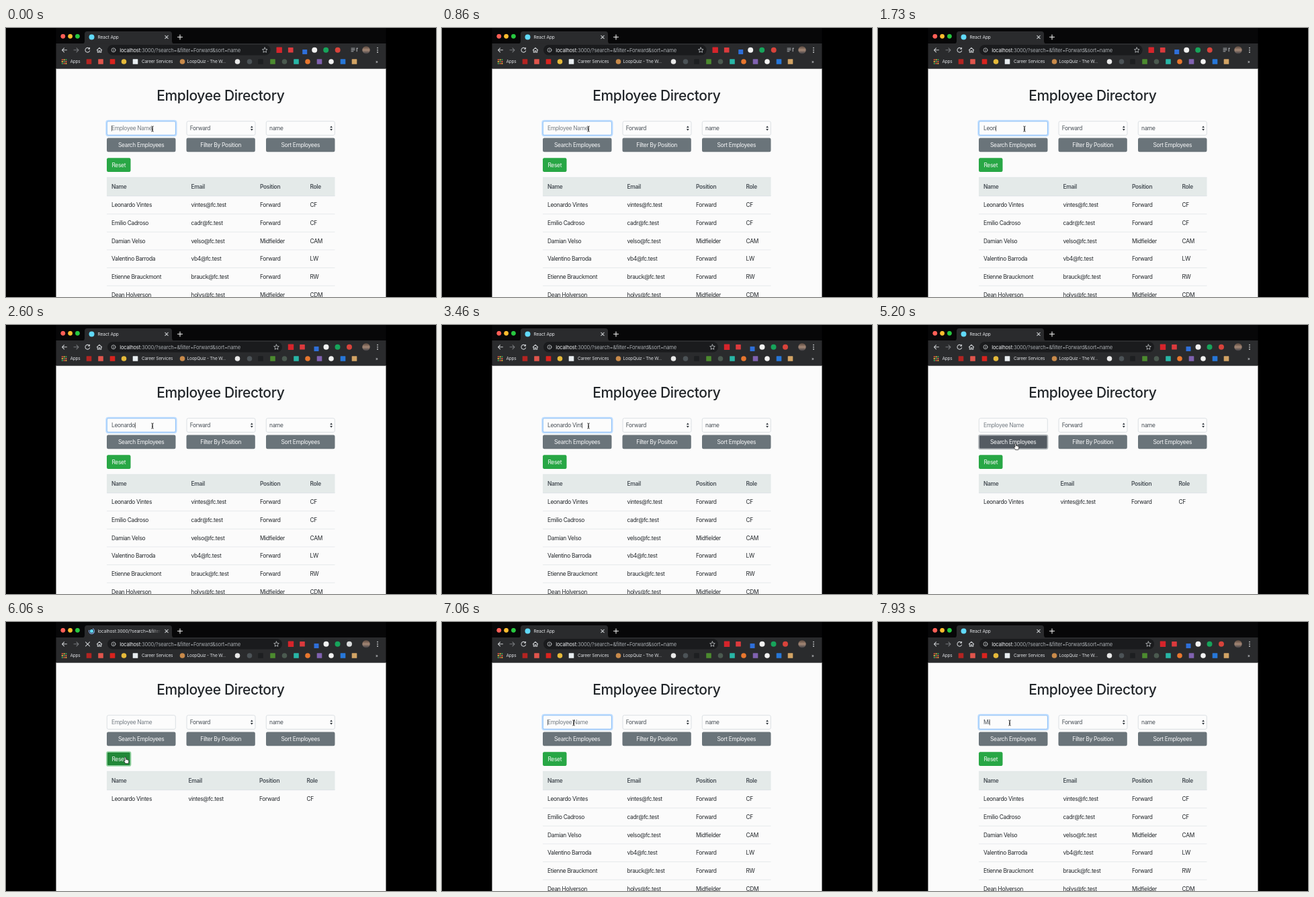
Write an HTML page that moves like this. It is 640 by 400 pixels and loops after 8000 ms.

```html
<!DOCTYPE html>
<html lang="en">
<head>
<meta charset="utf-8">
<title>Employee Directory</title>
<style>
  html, body { margin: 0; height: 100%; overflow: hidden; background: #000; }
  svg { display: block; width: 100vw; height: 100vh; }
  text { font: 8.4px Inter, Roboto, sans-serif; letter-spacing: -.3px; fill: #212529; white-space: pre; }
  .title { font-size: 21px; font-weight: 500; letter-spacing: -.35px; }
  .tab { font-size: 6.6px; letter-spacing: -.1px; fill: #e3e5e8; }
  .url { font-size: 7.6px; letter-spacing: -.2px; fill: #a6aaae; }
  .url tspan { fill: #eceef0; }
  .mark { font-size: 6.5px; letter-spacing: -.2px; fill: #dddfe2; }
  .mid { text-anchor: middle; }
  .btn text { fill: #f8f9fa; }
  .field { fill: #fcfcfc; stroke: #ced4da; stroke-width: .7; }
  .value { fill: #495057; }
  .hint { fill: #747c83; }
  .head text { font-weight: 600; fill: #495057; }
  .line { fill: none; stroke: #c6c9cc; stroke-width: 1.1; stroke-linecap: round; stroke-linejoin: round; }
  .rule { stroke: #dee2e6; stroke-width: .7; }
</style>
</head>
<body>
<svg viewBox="0 0 640 400">
  <defs>
    <linearGradient id="fade" gradientUnits="userSpaceOnUse" x1="216" x2="231">
      <stop stop-color="#fff"/><stop offset="1" stop-color="#000"/>
    </linearGradient>
    <mask id="tabMask"><path d="M117 5h115v18h-115z" fill="url(#fade)"/></mask>
    <linearGradient id="portrait" x2="0" y2="1">
      <stop stop-color="#57463d"/><stop offset=".5" stop-color="#a58876"/><stop offset="1" stop-color="#3b3c42"/>
    </linearGradient>
  </defs>

  <rect x="74.500" y="60" width="491" height="340" fill="#fbfbfb"/>
  <rect x="74.500" width="491" height="24" fill="#070708"/>
  <rect x="74.500" y="23" width="491" height="37.700" fill="#2a2b2d"/>
  <path d="M113 23.500q4 0 4-4V9q0-4 4-4h122q4 0 4 4v10.500q0 4 4 4z" fill="#2a2b2d"/>
  <g id="lights"></g>
  <g id="favicon">
    <circle id="favDot" cx="127.500" cy="13.500" fill="#61dafb"/>
    <path id="spinner" d="M127.500 9.500a4 4 0 1 1-4 4" fill="none" stroke="#8ab4f8"/>
  </g>
  <g mask="url(#tabMask)"><text id="tabTitle" class="tab" x="136.500" y="16"></text></g>
  <path class="line" d="M236.800 11.300l4.400 4.400m0-4.400l-4.400 4.400"/>
  <path class="line" d="M259 10v7m-3.500-3.500h7" style="stroke:#eee"/>

  <path class="line" d="M90.500 32.800h-7m3-3l-3 3 3 3"/>
  <path class="line" d="M101 32.800h7m-3-3l3 3-3 3" style="stroke:#777a7d"/>
  <path id="reload" class="line" d="M124.300 31a3.400 3.400 0 1 0 .3 2.800m-.1-4.600v2h-2"/>
  <path id="stop" class="line" d="M118.500 29.800l6 6m0-6l-6 6"/>
  <path class="line" d="M135.300 32.800l3.700-3.400 3.700 3.400m-6.400-.6v4h1.900v-2.400h1.600v2.400h1.900v-4"/>
  <rect id="pill" x="151" y="25" height="15.500" rx="7.700" fill="#1a1b1d"/>
  <g class="line" style="stroke-width:.8"><circle cx="160" cy="32.800" r="3"/><path d="M160 32.500v1.800m0-3.200v.1"/></g>
  <text class="url" x="169.300" y="35.500"><tspan>localhost</tspan>:3000/?search=&amp;filter=Forward&amp;sort=name</text>
  <g id="tools">
    <path class="line" style="stroke-width:.8" d="M402.500 29l1.100 2.500 2.700.3-2 1.800.5 2.700-2.300-1.300-2.300 1.300.5-2.700-2-1.800 2.700-.3z"/>
    <g id="extensions"></g>
    <circle id="devtools" cx="511" cy="32.800" r="4"/>
  </g>
  <path id="media" class="line" style="stroke-width:.9" d="M514 30.200h5m-5 2.300h5m-5 2.300h3m5.200-4.600v4.600m0-4.600h1.300"/>
  <circle cx="536" cy="32.800" r="5.700" fill="url(#portrait)"/>
  <g fill="#d2d4d6"><circle cx="553" cy="29.600" r=".9"/><circle cx="553" cy="32.800" r=".9"/><circle cx="553" cy="36" r=".9"/></g>

  <g id="bookmarks"></g>
  <text class="mark" x="95.500" y="52.300">Apps</text>
  <text class="mark" x="202" y="52.300">Career Services</text>
  <text class="mark" x="269.500" y="52.300">LoopQuiz - The W...</text>
  <text class="mark" x="550" y="52.300">»</text>

  <text class="title mid" x="319.400" y="107.500">Employee Directory</text>
  <g id="form"></g>
  <rect id="inputRing" x="149.200" y="137.700" width="104.400" height="22.600" rx="3" fill="none" stroke="#bfdeff" stroke-width="1.800"/>
  <rect id="inputEdge" x="150.300" y="138.800" width="102.200" height="20.400" rx="2" fill="none" stroke="#80bdff" stroke-width=".8"/>
  <text id="typed" class="value" x="157" y="152"></text>
  <path id="caret" d="M0 145v8.500" stroke="#333" stroke-width=".7"/>

  <rect x="150" y="222" width="339.500" height="28" fill="#e4eae9"/>
  <path class="rule" d="M150 222.200h339.500"/>
  <path class="rule" d="M150 249.700h339.500" style="stroke-width:1.100"/>
  <g id="allRows"></g>
  <g id="oneRow"></g>

  <g id="beam" fill="none">
    <path d="M-1.800-4q1.800 0 1.800 1v6q0 1-1.800 1m3.600-8q-1.800 0-1.800 1v6q0 1 1.800 1M-1 .8h2" stroke="#222" stroke-width=".8"/>
  </g>
  <path id="hand" d="M-1-3q0-1 .9-1t.9 1v2.600q.9-.5 1.400.2.900-.3 1.300.4 1.200-.2 1.200 1v1.800q0 1.100-.8 2.500h-4.100q-.5-1.200-1.600-2.400-1.300-1.300-.4-1.900.5-.3 1.200.6z" fill="#fff" stroke="#111" stroke-width=".7"/>
  <path id="arrow" d="M0 0v8l1.900-1.700 1.300 2.900 1.300-.6-1.300-2.800h2.600z" fill="#111" stroke="#fff" stroke-width=".6"/>
</svg>
<script>
const $ = id => document.getElementById(id);
const show = (id, on) => { $(id).style.display = on ? '' : 'none'; };
const circle = (x, y, r, color) => `<circle cx="${x}" cy="${y}" r="${r}" fill="${color}"/>`;
const square = (x, y, r, color) =>
  `<rect x="${x - r}" y="${y - r}" width="${2 * r}" height="${2 * r}" rx=".6" fill="${color}"/>`;
const label = (x, y, text, cls = '') => `<text class="${cls}" x="${x}" y="${y}">${text}</text>`;

// Browser chrome
$('lights').innerHTML = ['#ff5f57', '#febc2e', '#28c840']
  .map((color, i) => circle(84.8 + i * 10.8, 12.3, 3.4, color)).join('');

$('extensions').innerHTML =
  square(424, 32.8, 4.2, '#d6242b') + square(441, 32.8, 3.8, '#dc3a3d') +
  square(462, 35.5, 3.5, '#2f6fd8') + circle(476.5, 32.8, 4, '#f1f1f1') +
  circle(493.5, 32.8, 4, '#17a45b');

const marks = [
  [square, 123.5, '#b32422'], [square, 141, '#e0554c'], [square, 158.5, '#d9231e'],
  [circle, 175.5, '#e5b93a'], [square, 192.5, '#e8edf0'], [circle, 262.5, '#c98a4a'],
  [circle, 344.5, '#e9e9e9'], [circle, 362.5, '#4c5357'], [square, 379, '#1d1f21'],
  [square, 397, '#4c8b2f'], [circle, 414.5, '#4b5a50'], [square, 432, '#28b6a6'],
  [circle, 449, '#e8772e'], [square, 466.5, '#8062b0'], [circle, 484, '#f2f2f2'],
  [square, 501.5, '#2777d8'], [square, 518.5, '#d2a365']
];
const dotColors = ['#ea5546', '#f0b43c', '#45a95c'];
let dots = '';
for (let i = 0; i < 9; i++)
  dots += square(83.8 + i % 3 * 2.8, 47.2 + Math.floor(i / 3) * 2.8, 1, dotColors[(i + Math.floor(i / 3)) % 3]);
$('bookmarks').innerHTML = dots + marks.map(([shape, x, color]) => shape(x, 50, 3.8, color)).join('');

// Form
const box = (x, y, w, extra) => `<rect x="${x}" y="${y}" width="${w}" height="20.700" rx="2.200" ${extra}/>`;
const button = (id, x, y, w, text, color) =>
  `<g class="btn">${box(x, y, w, `id="${id}" fill="${color}"`)}${label(x + w / 2, y + 13.4, text, 'mid')}</g>`;
const select = (x, text) => box(x + .3, 138.7, 102, 'class="field"') + label(x + 5, 152, text, 'value') +
  `<path d="M${x + 95.2} 148.300l1.900-2.900 1.900 2.900zm0 1.600l1.900 2.900 1.900-2.900z" fill="#343a40"/>`;
$('form').innerHTML = box(150.3, 138.7, 102, 'class="field"') +
  select(268.7, 'Forward') + select(387, 'name') +
  button('search', 150, 163.6, 102.5, 'Search Employees', '#6a747a') +
  button('filter', 268.5, 163.6, 102.3, 'Filter By Position', '#6a747a') +
  button('sort', 387, 163.6, 102.5, 'Sort Employees', '#6a747a') +
  button('reset', 150, 193.2, 35.5, 'Reset', '#28a745');

// Table
const people = [
  ['Leonardo Vintes', 'vintes', 'Forward', 'CF'],
  ['Emilio Cadroso', 'cadr', 'Forward', 'CF'],
  ['Damian Velso', 'velso', 'Midfielder', 'CAM'],
  ['Valentino Barroda', 'vb4', 'Forward', 'LW'],
  ['Etienne Brauckmont', 'brauck', 'Forward', 'RW'],
  ['Dean Holverson', 'holvs', 'Midfielder', 'CDM']
];
const cells = (row, cols, y) => row.map((text, i) => label(cols[i], y, text)).join('');
const table = (rows, cols) =>
  `<g class="head">${cells(['Name', 'Email', 'Position', 'Role'], cols, 239)}</g>` +
  rows.map(([name, mail, position, role], i) => {
    const y = 266.4 + i * 26.65;
    const rule = i ? `<path class="rule" d="M150 ${y - 16.4}h339.500"/>` : '';
    return rule + cells([name, mail + '@fc.test', position, role], cols, y);
  }).join('');
$('allRows').innerHTML = table(people, [157, 275.5, 378, 452.5]);
$('oneRow').innerHTML = table(people.slice(0, 1), [157, 271.5, 377, 447.5]);

// Timeline, in ms
const LOOP = 8000, FIRST_KEY = 1100, KEY_STEP = 190, MEDIA_END = 2500;
const SEARCH = 4700, RESET = 5930, LOADED = 6180, FOCUS = 6860;
const query = people[0][0];
const moves = [
  [3880, 4340, 218, 150, 205, 180],
  [5180, 5680, 205, 180, 178, 205],
  [6350, 6800, 178, 205, 196, 150]
];

function pointer(t) {
  let x = 218, y = 150;
  for (const [from, to, x0, y0, x1, y1] of moves) {
    if (t < from) break;
    const p = Math.min(1, (t - from) / (to - from));
    const e = p * p * (3 - 2 * p);
    x = x0 + (x1 - x0) * e;
    y = y0 + (y1 - y0) * e;
  }
  return [x, y];
}

function typing(t) {
  if (t < SEARCH) {
    const n = Math.max(0, Math.min(query.length, Math.floor((t - FIRST_KEY) / KEY_STEP) + 1));
    return [query.slice(0, n), n ? FIRST_KEY + (n - 1) * KEY_STEP : 0];
  }
  if (t >= 7850) return ['Mi', 7850];
  if (t >= 7560) return ['M', 7560];
  return ['', FOCUS];
}

function paintButton(id, hover, focus, base, dark, ring) {
  const rect = $(id);
  rect.setAttribute('fill', hover || focus && id === 'reset' ? dark : base);
  rect.setAttribute('stroke', focus ? ring : 'none');
  rect.setAttribute('stroke-width', 1.8);
}

function draw(t) {
  const loading = t >= RESET && t < LOADED;
  const focused = t < SEARCH || t >= FOCUS;
  const filtered = t >= SEARCH && t < LOADED;
  const [x, y] = pointer(t);
  const overInput = y < 159.5;
  const overSearch = y > 163.6 && y < 184.3;
  const overReset = y > 193 && x < 185.5;

  const [text, lastKey] = typing(t);
  const typed = $('typed');
  typed.textContent = text || 'Employee Name';
  typed.setAttribute('class', text ? 'value' : 'hint');
  const end = text ? typed.getComputedTextLength() : 0;
  $('caret').setAttribute('transform', `translate(${157.3 + end} 0)`);
  show('caret', focused && (t - lastKey) % 1000 < 500);
  show('inputRing', focused);
  show('inputEdge', focused);

  paintButton('search', overSearch, t >= SEARCH && t < RESET, '#6a747a', '#545b62', '#b5babd');
  paintButton('reset', overReset, loading, '#28a745', '#218838', '#94d3a2');
  show('allRows', !filtered);
  show('oneRow', filtered);

  $('tabTitle').textContent = loading ? 'localhost:3000/?search=&filter=Forward' : 'React App';
  $('favDot').setAttribute('r', loading ? 2.6 : 4);
  $('spinner').setAttribute('transform', `rotate(${t * .36} 127.500 13.500)`);
  show('spinner', loading);
  show('stop', loading);
  show('reload', !loading);

  const playing = t < MEDIA_END;
  show('media', playing);
  $('tools').setAttribute('transform', `translate(${playing ? -17.3 : 0} 0)`);
  $('pill').setAttribute('width', playing ? 242.7 : 260);
  $('devtools').setAttribute('fill', loading ? '#dadcdd' : '#d8433b');

  const shape = overInput ? 'beam' : overSearch || overReset ? 'hand' : 'arrow';
  for (const id of ['beam', 'hand', 'arrow']) show(id, id === shape);
  $(shape).setAttribute('transform', `translate(${x} ${y})`);
}

const start = performance.now();
(function frame() {
  draw((performance.now() - start) % LOOP);
  requestAnimationFrame(frame);
})();
</script>
</body>
</html>
```
